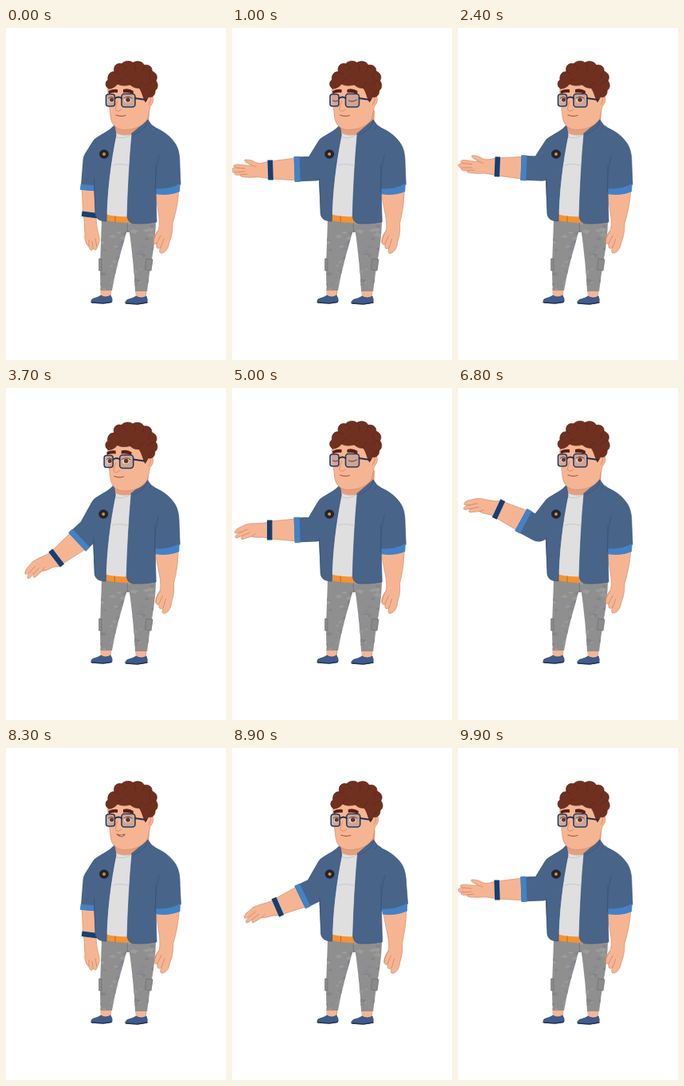
Recreate the animation shown at these times as an HTML page. Size 276 by 416 pixels, loop 10 s.

```html
<!DOCTYPE html>
<html lang="en">
<head>
<meta charset="utf-8">
<title>Gesturing man</title>
<style>
html, body { margin: 0; width: 100%; height: 100%; overflow: hidden; background: #fff; }
svg { display: block; width: 276px; height: 416px; }
path, line, ellipse, rect { stroke-linecap: round; stroke-linejoin: round; }
.skin { fill: #f6b592; stroke: #d58b6b; stroke-width: .7; }
.crease { fill: none; stroke: #cf8565; stroke-width: .8; }
.cloth { fill: #496489; stroke: #3c5680; stroke-width: .7; }
.seam { fill: none; stroke: #385178; stroke-width: .8; }
.cuff { fill: #4382c6; }
.shoe { fill: #3d5c8c; stroke: #2b4570; stroke-width: .7; }
.sole { fill: none; stroke: #26334f; stroke-width: 1.4; }
.hair { fill: #70301f; stroke: #5a2317; stroke-width: .7; }
.lock { fill: none; stroke: #5f2619; stroke-width: .8; }
.brow { fill: #5b2015; }
.frame { fill: #c69d91; fill-opacity: .75; stroke: #223c60; stroke-width: 1.6; }
.lid { fill: none; stroke: #5a3a35; stroke-width: 1; }
#sleeve { fill: none; stroke: #496489; stroke-width: 31; stroke-linecap: butt; }
#armCuff { stroke: #4382c6; stroke-width: 32; stroke-linecap: butt; }
#band { stroke: #153f74; stroke-width: 6.5; stroke-linecap: butt; }
</style>
</head>
<body>
<svg viewBox="0 0 276 416">
  <defs>
    <clipPath id="legs"><path d="M120 240H188C188 262 184 285 181 300L177 330H162C161 305 158 280 155 256H151C146 275 138 300 133 329H119C117 308 119 275 120 240Z"/></clipPath>
  </defs>

  <path class="skin" d="M119 326H132L131 339H120ZM163 328H176L175 339H164Z"/>
  <path class="shoe" d="M107 342C107 338 114 339 119 335Q125 339 131 335Q134 339 133 343Q127 346 107 344ZM150 343C151 339 158 340 163 336Q170 340 176 336Q178 340 177 344Q168 347 150 345Z"/>
  <path class="sole" d="M108 344L122 345L132 343.500M151 345L165 346L177 344"/>
  <g clip-path="url(#legs)">
    <rect x="112" y="238" width="80" height="95" fill="#8f8f90"/>
    <g id="camo"></g>
    <path d="M153 256Q151 247 153 242" fill="none" stroke="#757579"/>
  </g>
  <path d="M117 289H120V304H117ZM176 289L184 290L182 304L175 303Z" fill="#8a8a8c" stroke="#737377" stroke-width=".8"/>

  <g id="upper">
    <g id="arm">
      <path id="fore" class="skin"/>
      <g id="hand">
        <g id="relaxed" transform="rotate(90)">
          <path class="skin" d="M-8 0C-6 9 -7 16 -6 24C-7 32 -4 38 -1 40C0 45 4 46 4 42C7 46 10 43 9 40C13 37 13 29 11 24C9 17 8 10 8 0Z"/>
          <path class="crease" d="M4 42L3 33M9 40L7 30M-1 40L-1 32"/>
        </g>
        <g id="open">
          <path class="skin" d="M0 -11L-6 -10C-12 -8 -17 -8 -21 -11C-25 -13 -29 -13 -32 -13C-34 -11 -29 -9 -24 -6C-30 -5 -36 -7 -41 -7C-47 -7 -48 -4 -43 -3C-50 -3 -51 2 -45 3C-46 6 -42 7 -38 6C-38 9 -33 9 -29 9C-23 10 -18 8 -12 9L0 11Z"/>
          <path class="crease" d="M-43 -3L-32 -2M-45 3L-32 2M-38 6L-29 5M-24 -6L-18 -4"/>
        </g>
        <g id="flat">
          <path class="skin" d="M0 -11L-6 -9C-14 -8 -23 -9 -30 -7L-40 -2C-44 1 -45 4 -42 4L-37 3C-43 6 -45 10 -41 10L-34 7C-37 10 -36 13 -32 11L-23 8C-18 10 -13 9 -8 9L0 11Z"/>
          <path class="crease" d="M-37 3L-28 -1M-34 7L-25 3M-23 8L-18 5"/>
        </g>
      </g>
      <line id="band"/>
      <path id="sleeve"/>
      <line id="armCuff"/>
    </g>

    <g id="rightArm">
      <g id="rightFore">
        <path class="skin" d="M187 200L217 200C216 218 213 232 209 245C209 254 208 262 205 268C204 276 200 281 196 282C192 283 192 279 194 275C190 278 188 275 189 270C186 272 184 269 186 262L191 254C193 248 192 243 192 238Z"/>
        <path class="crease" d="M194 275L198 264M189 270L194 260M191 254Q187 257 185 268"/>
      </g>
      <path class="cloth" d="M178 122C195 126 207 136 213 146C217 153 218 161 218 172L219 196Q205 206 186 203Z"/>
      <path class="cuff" d="M186 201Q204 203 218.500 195L218 205Q204 211 187 208Z"/>
    </g>

    <path d="M136 126L160 126L156 180L153 236H124C125 198 130 160 136 126Z" fill="#dfdfe0"/>
    <path d="M134 172Q142 169 153 172M137 136Q147 141 158 133" fill="none" stroke="#bfc0c3" stroke-width=".8"/>
    <path d="M124 233Q138 237 154 236V244Q138 244 124 241Z" fill="#f59233"/>
    <path d="M137 236V243" stroke="#b86a20"/>
    <path d="M136 111L180 103L179 121C172 132 148 139 137 131Z" fill="#e3a07f"/>

    <path fill="#496489" d="M136 121C130 129 120 132 111 140L110 195L112 233C113 240 119 242 126 242C126 207 131 168 138 134Z"/>
    <path class="seam" d="M110.500 188L112 233C113 240 119 242 126 242C126 207 131 168 138 134L136 121"/>
    <path class="cloth" d="M158 132L178 115L183 122C196 127 198 150 187 168L189 243Q174 246 160 245Q153 244 152 236C153 200 155 165 158 132Z"/>
    <path fill="#496489" d="M182 124C192 128 199 132 203 137L201 164L186 170L177 150Z"/>
    <path class="seam" d="M178 115Q178 126 160 134M183 122L180 126M192 160Q188 172 187 205"/>
    <ellipse cx="123" cy="158" rx="6" ry="5.8" fill="#22252c"/>
    <circle cx="123" cy="158" r="2" fill="#e28a37"/>

    <g id="head">
      <path class="skin" d="M128 71C127 82 130 99 131 110C132 122 139 128 150 127.500C163 127 173 122 178 113L181 98C186 94 186 85 182 83L172 68Z"/>
      <path class="crease" d="M180 86Q184 89 179 96"/>
      <path class="hair" d="M129 76C124 74 124 67 128 65C127 59 131 54 136 55C134 48 139 43 145 45C149 40 157 41 159 43.500C165 40 172 42.500 173 46.500C180 45 184 50 183 54C189 56 191 62 188 66C192 71 190 77 187 78C188 84 183 88 179 86L175 93C172 88 171 80 167 75C162 76 158 73 156 71C149 73 143 72 140 70C137 74 133 76 129 76Z"/>
      <path class="lock" d="M136 55Q140 55 142 59M145 45Q150 47 151 52M159 43.500Q164 47 162 53M173 46.500Q174 52 170 55M183 54Q178 59 180 63M188 66Q180 67 178 72M140 70Q140 66 145 64M156 71Q155 67 161 65M167 75Q167 69 172 68M187 78Q180 79 179 86"/>
      <g id="face">
        <path class="brow" d="M128.500 79Q134 76 140 77V81Q134 80 129 82.500ZM147 77Q154 75 160 79L159.500 83Q153 80 147 81Z"/>
        <rect class="frame" x="125.500" y="83" width="11" height="15" rx="3"/>
        <rect class="frame" x="145" y="82.500" width="17" height="16.500" rx="3.500"/>
        <path d="M137 88Q141 85 145 88M162 88L176 90" fill="none" stroke="#1c3050" stroke-width="1.800"/>
        <g id="eyes">
          <ellipse cx="132" cy="90" rx="3.200" ry="3.500" fill="#e6d6cf"/>
          <ellipse cx="152.500" cy="90" rx="4.500" ry="3.700" fill="#e6d6cf"/>
          <circle cx="132.500" cy="90" r="2.500" fill="#633428"/>
          <circle cx="153" cy="90" r="2.800" fill="#633428"/>
          <path class="lid" d="M128.500 88Q132 85 135.500 88M148 88Q153 84.500 158 88"/>
        </g>
        <path id="lids" class="lid" d="M129 91Q132 93 135.500 91M149 91Q153 93.500 159 90"/>
        <path class="crease" d="M140 92C138 98 136 102 139 104Q142 105 145 102"/>
        <path id="mouth" stroke="#a6573f" stroke-width="1.100"/>
      </g>
    </g>
  </g>
</svg>
<script>
const LOOP = 10000, STEP = 100, CYCLE = 4100;
const $ = id => document.getElementById(id);

// elbow x y, cuff x y, wrist x y, wrist width, hand angle
const down   = [112, 166, 109, 204, 105, 234, 17, -90];
const point  = [107, 177, 90, 193, 64, 213, 21, -23];
const flat   = [106, 177, 79, 178, 48, 178, 22, 0];
const open   = [106, 176, 79, 177, 49, 178, 22, 0];
const raised = [101, 177, 79, 165, 51, 152, 22, 13];

const armKeys = [[0, down], [200, down], [550, point], [900, flat], [1000, open],
  [2300, open], [2700, raised], [3150, flat], [3700, point], [CYCLE, down]];
// head x y, face x, body x, right arm angle, right forearm angle
const rest = [0, 0, 0, 0, 0, 0], turned = [-1.7, 0, 0, -.8, 0, -3];
const bodyKeys = [[0, rest], [500, [0, 0, 0, 0, -4, 0]], [900, turned], [1100, turned],
  [1700, rest], [2700, rest], [3700, [.5, 1.5, -2, -.8, 0, -3]], [CYCLE, rest]];

function sample(keys, t) {
  const i = keys.findIndex(k => k[0] > t);
  const [t0, a] = keys[i - 1], [t1, b] = keys[i];
  const u = (t - t0) / (t1 - t0), e = u * u * (3 - 2 * u);
  return a.map((v, n) => v + (b[n] - v) * e);
}

function show(id, on) { $(id).style.display = on ? "" : "none"; }

function setLine(id, x1, y1, x2, y2) {
  Object.entries({ x1, y1, x2, y2 }).forEach(([k, v]) => $(id).setAttribute(k, v));
}

function unit(x, y) {
  const d = Math.hypot(x, y);
  return [x / d, y / d];
}

function drawArm(p) {
  const [kx, ky, cx, cy, wx, wy, width, angle] = sample(armKeys, p);
  const [ux, uy] = unit(cx - kx, cy - ky);
  const [vx, vy] = unit(wx - cx, wy - cy);
  const h = width / 2, b = h + 1.5;
  $("sleeve").setAttribute("d", `M140 140L122 150L${kx} ${ky}L${cx} ${cy}`);
  setLine("armCuff", cx - ux * 7, cy - uy * 7, cx, cy);
  setLine("band", wx - vy * b, wy + vx * b, wx + vy * b, wy - vx * b);
  const sx = cx - ux * 3, sy = cy - uy * 3;
  $("fore").setAttribute("d", `M${sx - uy * 14} ${sy + ux * 14}L${wx - vy * h} ${wy + vx * h}` +
    `L${wx + vy * h} ${wy - vx * h}L${sx + uy * 14} ${sy - ux * 14}Z`);
  $("hand").setAttribute("transform", `translate(${wx} ${wy}) rotate(${angle})`);
  const isRelaxed = p < 450 || p >= 3950, isOpen = p >= 1000 && p < 2500;
  show("relaxed", isRelaxed);
  show("open", isOpen);
  show("flat", !isRelaxed && !isOpen);
}

function drawBody(p) {
  const [hx, hy, fx, bx, arm, fore] = sample(bodyKeys, p);
  $("upper").setAttribute("transform", `translate(${bx} 0)`);
  $("head").setAttribute("transform", `translate(${hx} ${hy})`);
  $("face").setAttribute("transform", `translate(${fx} 0)`);
  $("rightArm").setAttribute("transform", `rotate(${arm} 200 140)`);
  $("rightFore").setAttribute("transform", `rotate(${fore} 203 200)`);
  const closed = p >= 850 && p < 1100;
  show("eyes", !closed);
  show("lids", closed);
  const smile = p >= 100 && p < 700;
  $("mouth").setAttribute("fill", smile ? "#f3e4dc" : "none");
  $("mouth").setAttribute("d", smile ? "M139 108Q144 110 149 108Q146 114 139 108Z"
    : "M138 109Q143 111.500 150 109.500");
}

function addCamo() {
  let seed = 7;
  const rnd = () => (seed = seed * 16807 % 2147483647) / 2147483647;
  const tones = ["#858588", "#999999", "#878b93", "#9d9c9b"];
  let html = "";
  for (let i = 0; i < 64; i++) {
    const x = 117 + rnd() * 72, y = 244 + rnd() * 84, r = 2 + rnd() * 3;
    html += `<path d="M${x - r} ${y}l${r} ${-r * .7}l${r * 1.3} ${r * .4}l${-r * .6} ${r * .8}z" fill="${tones[i % 4]}"/>`;
  }
  $("camo").innerHTML = html;
}

function frame() {
  const t = Math.floor(performance.now() % LOOP / STEP) * STEP;
  const p = t % CYCLE;
  drawArm(p);
  drawBody(p);
  requestAnimationFrame(frame);
}

addCamo();
frame();
</script>
</body>
</html>
```
